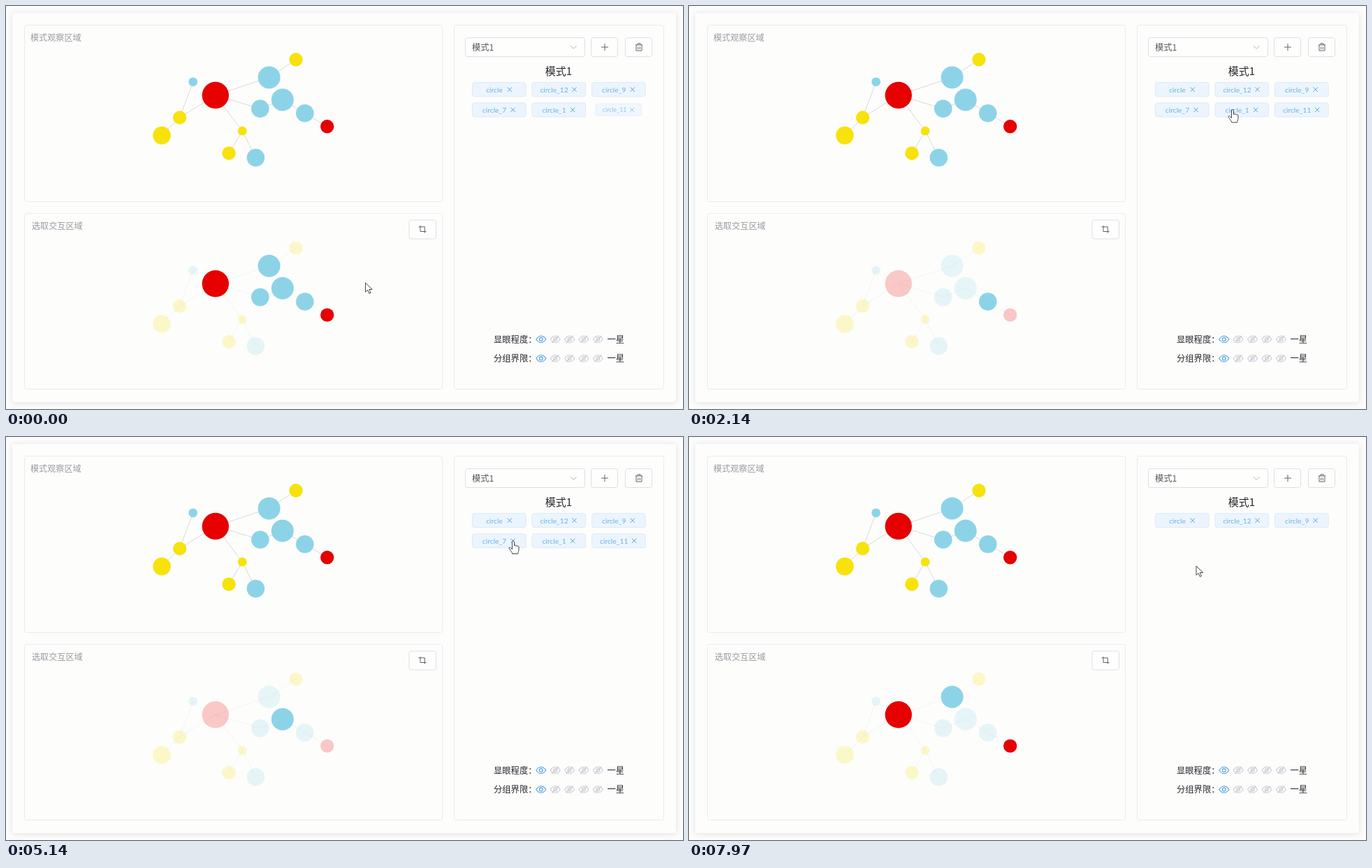
These frames come from a looping animation (969 by 578 pixels, 8000 ms). An HTML page:

```html
<!DOCTYPE html>
<html lang="zh-CN">
<head>
<meta charset="utf-8">
<style>
  html, body { margin: 0; width: 100%; height: 100%; overflow: hidden; background: #fdfdfb; }
  svg { display: block; width: 100%; height: 100%; font-family: 'Noto Sans CJK SC', 'Noto Sans CJK', sans-serif; }
  .card { fill: #fdfdfc; filter: drop-shadow(0 1px 5px rgba(60, 70, 110, .16)); }
  .box { fill: none; stroke: #e9ebf2; }
  .control { fill: #fefefd; stroke: #dcdfe6; }
  .icon { fill: none; stroke: #5f6268; stroke-width: 1; }
  .label { font-size: 12.1px; fill: #999b9f; }
  .rate { font-size: 12.3px; fill: #26282c; }
  .edge { stroke: #cfd0d2; stroke-width: .8; }
  .tag rect { fill: #ecf5fe; stroke: #d9eafb; }
  .tag text { font: 10.3px Lato, sans-serif; fill: #68b2e4; text-anchor: middle; }
  .tag path { stroke: #4fa5e0; stroke-width: 1; }
  .cursor { fill: #fff; stroke: #44464c; stroke-width: 1; stroke-linejoin: round; }
</style>
</head>
<body>
<svg viewBox="0 0 969 578" xmlns="http://www.w3.org/2000/svg">
  <rect class="card" x="9" y="10" width="950" height="558" rx="3"/>
  <rect class="box" x="26.5" y="27.5" width="598" height="253" rx="3"/>
  <rect class="box" x="26.5" y="297.5" width="598" height="252" rx="3"/>
  <rect class="box" x="641.5" y="27.5" width="300" height="522" rx="3"/>
  <text class="label" x="35" y="49.8">模式观察区域</text>
  <text class="label" x="37" y="320">选取交互区域</text>

  <rect class="control" x="657.5" y="45.5" width="171" height="27" rx="3"/>
  <rect class="control" x="837.5" y="45.5" width="38" height="27" rx="3"/>
  <rect class="control" x="886.5" y="45.5" width="38" height="27" rx="3"/>
  <rect class="control" x="577" y="307" width="38.5" height="27" rx="3"/>
  <text x="667" y="64" font-size="12.3" fill="#55575c">模式1</text>
  <path class="icon" style="stroke:#b4b8c0" d="M808 57l4.3 4.3 4.3-4.3"/>
  <path class="icon" d="M852 59h10M857 54v10"/>
  <path class="icon" d="M901 55.8h10M904 55.5v-1.7h4v1.7M902 56v8h8v-8M904.7 58.5v3.5M907.3 58.5v3.5"/>
  <path class="icon" d="M593 315v8.5h8.5M590.500 316.800H599.300V325.500"/>
  <text x="791" y="99.300" font-size="15" fill="#26282c" text-anchor="middle">模式1</text>

  <g id="ratings"></g>
  <g id="observed"></g>
  <g id="selection" transform="translate(0 270.3)"></g>
  <g id="tags"></g>
  <g class="cursor">
    <path id="arrow" d="M0 0V13.200L3.200 10.300 5.300 15.300 7.500 14.400 5.400 9.500H9.700Z"/>
    <path id="hand" d="M-1.500 1.500a1.500 1.500 0 0 1 3 0V7c.4-1.300 2.400-1 2.500.4.400-1.100 2.200-.8 2.300.5.400-.8 1.700-.5 1.700.7v4.200c0 2.200-1.200 3-1.400 5.700H-1.200c-.3-2.500-3-4.500-4.600-7.600-.7-1.400.9-2.300 2-1.100l2.300 2.400Z"/>
  </g>
</svg>
<script>
const LOOP = 8000, ZOOM = 250;
const RED = '#e60000', BLUE = '#8dd3e8', YELLOW = '#f7e20c';
const $ = id => document.getElementById(id);

function add(parent, name, attrs = {}, text = '') {
  const el = document.createElementNS('http://www.w3.org/2000/svg', name);
  for (const key in attrs) el.setAttribute(key, attrs[key]);
  el.textContent = text;
  return parent.appendChild(el);
}

// x, y, radius, colour, tag name
const nodes = [
  [299.8, 128, 19.2, RED, 'circle'],
  [376.6, 102.4, 16, BLUE, 'circle_9'],
  [395.8, 134.5, 16, BLUE, 'circle_7'],
  [363.8, 147.3, 12.8, BLUE, 'circle_11'],
  [427.8, 153.7, 12.8, BLUE, 'circle_1'],
  [459.7, 172.8, 9.7, RED, 'circle_12'],
  [415, 76.8, 9.7, YELLOW],
  [267.7, 108.8, 6.4, BLUE],
  [248.6, 160, 9.7, YELLOW],
  [223, 185.6, 12.8, YELLOW],
  [338.2, 179.2, 6.4, YELLOW],
  [319, 211.2, 9.7, YELLOW],
  [357.4, 217.5, 12.8, BLUE]
];
const edges = [[0, 1], [1, 6], [0, 3], [3, 2], [2, 4], [4, 5],
               [0, 8], [8, 9], [7, 8], [0, 10], [10, 11], [10, 12]];

function drawGraph(parent, edgeOpacity) {
  for (const [a, b] of edges) {
    const [x1, y1] = nodes[a], [x2, y2] = nodes[b];
    add(parent, 'line', { class: 'edge', x1, y1, x2, y2, opacity: edgeOpacity });
  }
  return nodes.map(([cx, cy, r, fill]) => add(parent, 'circle', { cx, cy, r, fill }));
}
drawGraph($('observed'), 1);
const selectable = drawGraph($('selection'), .25);

function drawRating(y, label) {
  const row = $('ratings');
  add(row, 'text', { class: 'rate', x: 698, y: y + 4.5 }, label);
  for (let i = 0; i < 5; i++) {
    const eye = add(row, 'g', {
      transform: `translate(${765.8 + i * 20.4} ${y})`, fill: 'none',
      stroke: i ? '#c8cbd3' : '#4a9fe0', 'stroke-width': 1.1
    });
    add(eye, 'path', { d: 'M-7 0Q-4-4.800 0-4.800T7 0Q4 4.800 0 4.800T-7 0Z' });
    add(eye, 'circle', { r: 2.4 });
    if (i) add(eye, 'path', { d: 'M-5 5L5-5' });
  }
  add(row, 'text', { class: 'rate', x: 860.5, y: y + 4.5 }, '一星');
}
drawRating(478, '显眼程度：');
drawRating(505.5, '分组界限：');

const removedAt = { circle_7: 5150, circle_1: 6650, circle_11: 7200 };
const tags = ['circle', 'circle_12', 'circle_9', 'circle_7', 'circle_1', 'circle_11'].map(name => {
  const el = add($('tags'), 'g', { class: 'tag' });
  const width = name.length * 4.8 - 5.5;
  add(el, 'rect', { x: -38.3, y: -10, width: 76.6, height: 20, rx: 3 });
  add(el, 'text', { x: -6.7, y: 4 }, name);
  add(el, 'path', { d: `M${width / 2 + .2}-3.200l6.400 6.400m0-6.400l-6.400 6.400` });
  return { name, el, end: removedAt[name] ?? Infinity };
});

// time, x, y of the pointer tip
const route = [
  [0, 514.5, 397], [850, 764, 259.5], [1150, 764, 259.5], [1900, 778, 148.5],
  [2300, 778, 148.5], [2850, 860, 153.5], [3250, 860, 153.5], [4000, 692, 148.5],
  [4450, 692, 148.5], [4900, 726, 149], [5300, 726, 149], [5850, 769, 148.5],
  [6100, 769, 148.5], [6500, 726, 149], [7300, 726, 149], [7800, 726, 185], [LOOP, 726, 185]
];

function pointerAt(t) {
  const i = route.findIndex(stop => t < stop[0]);
  const [t0, x0, y0] = route[i - 1], [t1, x1, y1] = route[i];
  const u = (t - t0) / (t1 - t0), k = u * u * (3 - 2 * u);
  return [x0 + (x1 - x0) * k, y0 + (y1 - y0) * k];
}

function render(t) {
  const [px, py] = pointerAt(t);
  let slot = 0, hovered = null;
  for (const { name, el, end } of tags) {
    const gone = t >= end + ZOOM;
    el.style.display = gone ? 'none' : '';
    if (gone) continue;
    const x = 705.7 + slot % 3 * 85.6, y = 119.7 + Math.floor(slot / 3) * 29.2;
    slot++;
    const entering = name === 'circle_11' ? Math.min(1, .86 + t / 1000) : 1;
    const scale = Math.min(entering, t < end ? 1 : 1 - (t - end) / ZOOM);
    el.setAttribute('transform', `translate(${x} ${y}) scale(${scale})`);
    el.setAttribute('opacity', scale < 1 ? scale * .85 : 1);
    if (Math.abs(px - x) < 38.5 && Math.abs(py - y) < 10.5) hovered = name;
  }
  // Single-node focus applies only until the first tag is removed.
  const focus = t < removedAt.circle_7 ? hovered : null;
  selectable.forEach((circle, i) => {
    const name = nodes[i][4];
    const active = name && (focus ? name === focus : t < (removedAt[name] ?? Infinity));
    circle.setAttribute('opacity', active ? 1 : .21);
  });
  $('arrow').style.display = hovered ? 'none' : '';
  $('hand').style.display = hovered ? '' : 'none';
  $('arrow').parentNode.setAttribute('transform', `translate(${px} ${py})`);
}

const start = performance.now();
function tick() {
  render((performance.now() - start) % LOOP);
  requestAnimationFrame(tick);
}
tick();
</script>
</body>
</html>
```
